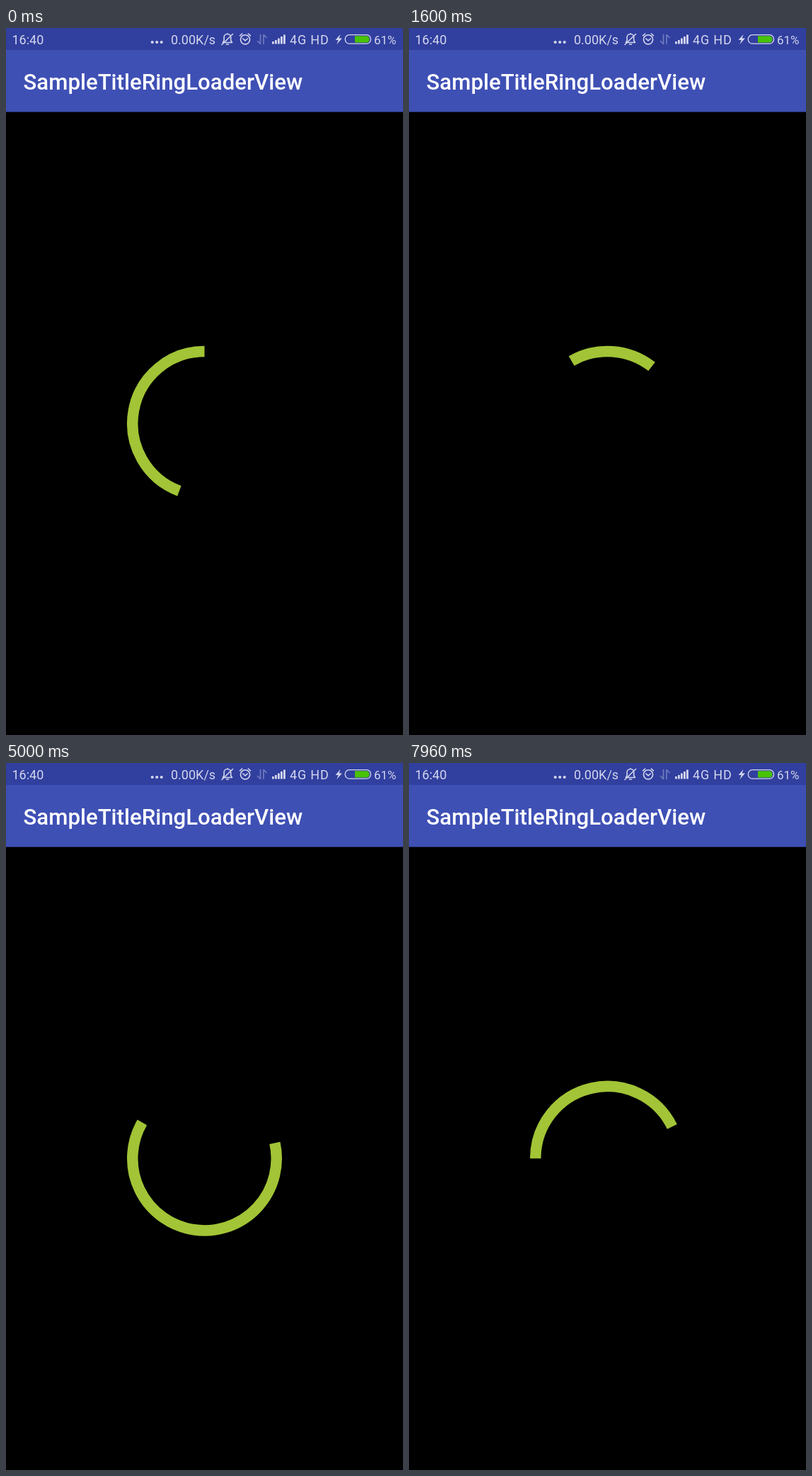
These frames come from a looping animation (561 by 998 pixels, 8 s). An HTML page:

```html
<!DOCTYPE html>
<html lang="en">
<head>
<meta charset="utf-8">
<title>Circle progress</title>
<style>
  html, body { margin: 0; width: 100%; height: 100%; overflow: hidden; background: #000; }
  svg { display: block; width: 561px; height: 998px; }
  text { font-family: Roboto, "Noto Sans", sans-serif; }
  .status { font-size: 18px; fill: #d3d6ec; }
  .status .small { font-size: 17px; }
  .line { fill: none; stroke: #d3d6ec; stroke-width: 1.6; stroke-linecap: round; stroke-linejoin: round; }
  .line .dim { stroke: #737dc0; }
  .solid { fill: #d3d6ec; }
  .title { font-size: 31.2px; font-weight: 500; fill: #fff; }
  #ring { fill: none; stroke: #a2c436; stroke-width: 15.5; }
</style>
</head>
<body>
<svg viewBox="0 0 561 998">
  <rect width="561" height="998"/>
  <rect width="561" height="31" fill="#313f9f"/>
  <rect y="31" width="561" height="87.5" fill="#3f50b5"/>

  <g class="status">
    <text x="8.5" y="22.5">16:40</text>
    <text x="233" y="22.5">0.00K/s</text>
    <text x="401" y="22.5" letter-spacing=".8">4G HD</text>
    <text class="small" x="520" y="22.5">61%</text>
  </g>

  <g class="solid">
    <circle cx="206.7" cy="20" r="2.1"/>
    <circle cx="213.2" cy="20" r="2.1"/>
    <circle cx="219.7" cy="20" r="2.1"/>
    <path d="M376 19h2.8v3.5h-2.8zM380 17h2.8v5.5h-2.8zM384 14.5h2.8v8h-2.8zM388 12h2.8v10.5h-2.8zM392 9.5h2.8v13h-2.8z"/>
    <path d="M472.5 9l-7 8h4.2l-2.4 6 7.7-8.6h-4.3z"/>
  </g>

  <g class="line">
    <path d="M306.5 20.5h13l-1.8-2.8v-4.4a4.8 4.8 0 0 0-9.6 0v4.4zM313 8.4v-.6M311.5 23h3M305 23.5L320.5 8.5"/>
    <circle cx="338" cy="16.3" r="6.6"/>
    <path d="M334.8 15l3.2 2.8 3.4-2.8M330.5 10.8l3.2-2.8M345.5 10.8l-3.2-2.8"/>
    <path class="dim" d="M359.5 9.5v13l-4-4M364 22.5v-13l4 4"/>
    <rect x="479.2" y="9.7" width="36.3" height="12.4" rx="6" stroke-width="1.3"/>
  </g>
  <path d="M493 11.3h16a4.6 4.6 0 0 1 0 9.2h-16z" fill="#48c306"/>

  <text class="title" x="24.5" y="87">SampleTitleRingLoaderView</text>
  <path id="ring"/>
</svg>

<script>
  const LOOP = 8000, STEP = 40;
  const CX = 280.5, CY = 558.2, RADIUS = 101.75;
  const ring = document.getElementById("ring");

  // [time in ms, arc length in degrees]; the length swings between 30 and 330
  const lengths = [
    [0, 159.5], [320, 127.2], [1240, 30], [1600, 67.9], [3640, 291], [4002, 330],
    [5000, 222.4], [6720, 35.5], [6775, 30], [8000, 158]
  ];

  // Each phase pins one end of the arc, in degrees clockwise from the top
  const phases = [
    { until: 1240, head: 360 },
    { until: 4002, tail: 330 },
    { until: 6775, head: 300 },
    { until: LOOP, tail: 270 }
  ];

  function lengthAt(time) {
    const i = lengths.findIndex(([t]) => t > time);
    const [t0, a] = lengths[i - 1], [t1, b] = lengths[i];
    return a + (b - a) * (time - t0) / (t1 - t0);
  }

  function point(degrees) {
    const a = degrees * Math.PI / 180;
    return `${CX + RADIUS * Math.sin(a)} ${CY - RADIUS * Math.cos(a)}`;
  }

  function draw(now) {
    const time = Math.floor(now % LOOP / STEP) * STEP;
    const length = lengthAt(time);
    const { head, tail = head - length } = phases.find(p => time < p.until);
    ring.setAttribute("d",
      `M${point(tail)}A${RADIUS} ${RADIUS} 0 ${length > 180 ? 1 : 0} 1 ${point(tail + length)}`);
  }

  const start = performance.now();
  function tick() {
    draw(performance.now() - start);
    requestAnimationFrame(tick);
  }
  tick();
</script>
</body>
</html>
```
